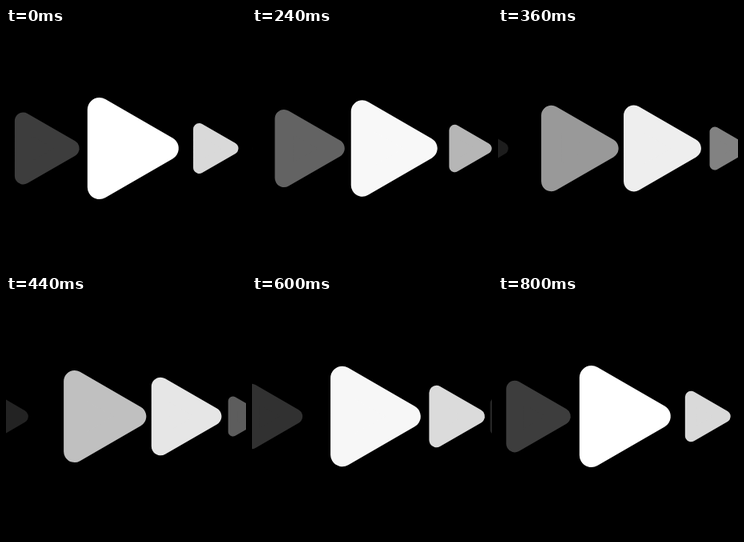
An HTML page with a canvas that plays this animation: 300x300 px, repeating every 0.84 s.

```html
<!DOCTYPE html>
<html lang="en">
<head>
<meta charset="utf-8">
<title>Forward arrows</title>
<style>
  html, body { margin: 0; height: 100%; overflow: hidden; background: #000; }
  canvas { display: block; }
</style>
</head>
<body>
<canvas id="stage" width="300" height="300"></canvas>
<script>
const ctx = document.getElementById('stage').getContext('2d');
const LOOP = 840, STEP = 40, MID_Y = 150.5;

// Resting places, left to right; x is the centre of the arrow.
const hidden = { x: -29, height: 63, tone: .09 };
const small = { x: 51.3, height: 90, tone: .24 };
const big = { x: 158.8, height: 127, tone: 1 };
const bright = { x: 262.3, height: 63, tone: .85 };
const gone = { x: 321, height: 43, tone: .1 };

// Each arrow eases to the next place between two steps; size may lag behind.
const moves = [
  { from: hidden, to: small, span: [4, 20] },
  { from: small, to: big, span: [.5, 16] },
  { from: big, to: bright, span: [.5, 16.5], sizeSpan: [1, 20] },
  { from: bright, to: gone, span: [.5, 16.5] }
];

const mix = (a, b, p) => a + (b - a) * p;

function easeInOut(step, [start, end]) {
  const p = Math.min(1, Math.max(0, (step - start) / (end - start)));
  return (1 - Math.cos(Math.PI * p)) / 2;
}

// Equilateral triangle with round corners, pointing right.
function drawArrow(x, height, tone) {
  const radius = height * .118, side = height - 2 * radius;
  const depth = side * Math.sqrt(3) / 2, left = x - depth / 2;
  const level = Math.round(tone * 255);
  ctx.fillStyle = ctx.strokeStyle = `rgb(${level}, ${level}, ${level})`;
  ctx.lineWidth = 2 * radius;
  ctx.lineJoin = 'round';
  ctx.beginPath();
  ctx.moveTo(left, MID_Y - side / 2);
  ctx.lineTo(left + depth, MID_Y);
  ctx.lineTo(left, MID_Y + side / 2);
  ctx.closePath();
  ctx.fill();
  ctx.stroke();
}

function render() {
  // The first pose holds for two steps.
  const step = Math.max(0, Math.floor(performance.now() % LOOP / STEP) - 1);
  ctx.fillStyle = '#000';
  ctx.fillRect(0, 0, 300, 300);
  for (const { from, to, span, sizeSpan = span } of moves) {
    const p = easeInOut(step, span);
    drawArrow(
      mix(from.x, to.x, p),
      mix(from.height, to.height, easeInOut(step, sizeSpan)),
      mix(from.tone, to.tone, p)
    );
  }
  requestAnimationFrame(render);
}
render();
</script>
</body>
</html>
```
